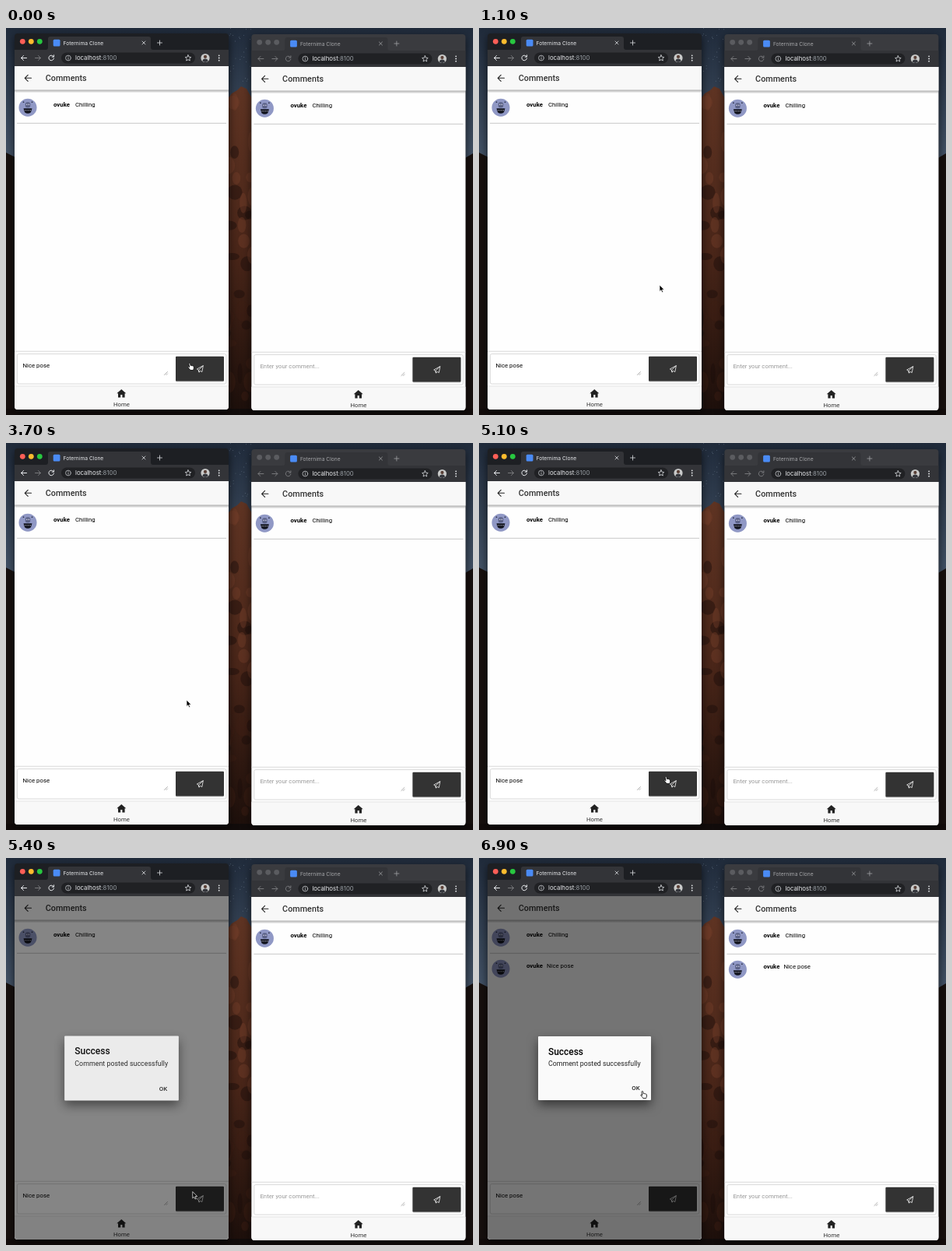
These frames come from a looping animation (600x497 px, 7000 ms). An HTML page:

```html
<!DOCTYPE html>
<html lang="en">
<head>
<meta charset="utf-8">
<title>Comments</title>
<style>
html, body { margin: 0; width: 100%; height: 100%; overflow: hidden; background: #140d0b; }
svg { display: block; width: 600px; height: 497px; font: 7.8px Roboto, sans-serif; fill: #000; }
.chrome { font-family: Inter, sans-serif; }
.bold { font-weight: 700; }
.medium { font-weight: 500; }
.line { fill: none; stroke-linecap: round; stroke-linejoin: round; }
.window { filter: drop-shadow(0 4px 6px #000a); }
</style>
</head>
<body>
<svg id="stage" viewBox="0 0 600 497"></svg>
<script>
const LOOP = 7000;
const PAGE = "M11 49H286V486a4 4 0 0 1-4 4H15a4 4 0 0 1-4-4Z";
const stage = document.getElementById("stage");

const rect = (x, y, w, h, fill, more = "") =>
  `<rect x="${x}" y="${y}" width="${w}" height="${h}" fill="${fill}" ${more}/>`;
const dot = (x, y, r, fill) => `<circle cx="${x}" cy="${y}" r="${r}" fill="${fill}"/>`;
const line = (d, color, width = 1) =>
  `<path class="line" d="${d}" stroke="${color}" stroke-width="${width}"/>`;
const text = (x, y, words, more = "") => `<text x="${x}" y="${y}" ${more}>${words}</text>`;

function backdrop() {
  let rocks = "", stars = "", seed = 7;
  const random = () => (seed = seed * 16807 % 2147483647) / 2147483647;
  for (let i = 0; i < 34; i++) {
    const y = 95 + random() * 390;
    const fill = random() < .5 ? "#1a0e0b" : y < 310 ? "#743f2a" : "#3d1f15";
    rocks += `<ellipse cx="${284 + random() * 34}" cy="${y}" rx="${3 + random() * 7}"
      ry="${4 + random() * 10}" fill="${fill}" opacity=".45"/>`;
  }
  for (let i = 0; i < 26; i++)
    stars += dot(286 + random() * 30, random() * 72, .35, "#9fb0c4");
  return `<defs>
    <linearGradient id="sky" x2="0" y2="1"><stop stop-color="#202b3b"/><stop offset="1" stop-color="#46566a"/></linearGradient>
    <linearGradient id="rock" x2="0" y2="1"><stop stop-color="#5f3423"/><stop offset=".5" stop-color="#4a2619"/>
      <stop offset="1" stop-color="#1c0f0b"/></linearGradient>
    <linearGradient id="fade" x2="0" y2="1"><stop stop-opacity=".32"/><stop offset="1" stop-opacity="0"/></linearGradient>
    </defs>` +
    rect(0, 0, 600, 180, "url(#sky)") + stars +
    `<path d="M0 160L12 166V497H0ZM588 168L600 161V497H588Z" fill="#17100e"/>
    <path d="M284 92L290 84 297 80 302 75 309 78 317 92V497H284Z" fill="url(#rock)"/>` +
    rocks + rect(0, 489, 600, 8, "#120c0b");
}

const avatar = y => dot(28, y, 11.5, "#9098c5") + dot(22.5, y - 7, .9, "#30364f") +
  dot(33.5, y - 7, .9, "#30364f") + rect(24.8, y - 7, 6.4, 7, "#5b6287", 'rx="2.5"') +
  dot(26.8, y - 4, .8, "#dde") + dot(29.4, y - 4, .8, "#dde") +
  `<path d="M22.5 ${y + 1}H33.5L32 ${y + 6}Q28 ${y + 9} 24 ${y + 6}Z" fill="#11131d"/>` +
  line(`M24.7 ${y + 3.5}h6.8`, "#d5d8e8", "1.1\" stroke-dasharray=\".2 2");

const comment = (y, x, words) => avatar(y) +
  text(61, y - 1.2, "ovuke", 'class="bold"') + text(x, y - 1.2, words);

function browser(active) {
  const dim = active ? "#e8eaed" : "#77787b";
  const lights = active ? ["#ff5f57", "#febc2e", "#28c840"] : ["#5b5c60", "#5b5c60", "#5b5c60"];
  const bar = "#333438";
  return `<g class="window">` +
    rect(11, 7, 275, 483, active ? "#1d1f23" : "#3a3b3f", 'rx="4"') +
    `<path d="M51 28q3 0 3-3V14q0-3 3-3H183q3 0 3 3V25q0 3 3 3Z" fill="${bar}"/>` +
    rect(11, 28, 275, 21, bar) +
    lights.map((color, i) => dot(21.3 + i * 11, 17.3, 3.4, color)).join("") +
    rect(60.7, 14.7, 8.8, 8.8, "#4a8bf5", 'rx="1.5"') +
    text(73.5, 21.7, "Foternima Clone", `class="chrome" font-size="6.7" fill="${active ? "#e8eaed" : "#a5a6a9"}"`) +
    line("M175 17l4 4m0-4l-4 4M194.5 19h6m-3-3v6", active ? "#dadce0" : "#a0a1a4", .8) +
    line("M26.5 38.5h-7m3-3l-3 3 3 3", dim) +
    line("M37.5 38.5h7m-3-3l3 3-3 3", "#77787b") +
    line("M61 36.6A3.3 3.3 0 1 0 61.5 39M61.5 34.8v2.3h-2.3", dim) +
    rect(71, 31.5, 172, 14, "#202124", 'rx="7"') +
    line("M80 38v2.2M80 36.4v.1M83.4 38.5a3.4 3.4 0 1 0-6.8 0a3.4 3.4 0 1 0 6.8 0", "#c4c7cb", .8) +
    text(89, 41.3, 'localhost<tspan fill="#9aa0a6">:8100</tspan>', 'class="chrome" fill="#e8eaed"') +
    line("M234 34.7l1.1 2.5 2.7.3-2 1.8.5 2.7-2.3-1.4-2.3 1.4.5-2.7-2-1.8 2.7-.3Z", "#dadce0", .8) +
    dot(256, 38.5, 5.6, "#c9cac9") + dot(256, 36.9, 2.1, "#5a4037") +
    `<path d="M252.4 42.6q.3-3.2 3.6-3.2t3.6 3.2q-3.6 2.6-7.2 0Z" fill="#34363c"/>` +
    [35.3, 38.5, 41.7].map(y => dot(273.7, y, .9, "#e8eaed")).join("") +

    `<path d="${PAGE}" fill="#fefefe"/>` +
    rect(11, 49, 275, 30.5, "#f8f8f8") + rect(11, 79.5, 275, 4, "url(#fade)") +
    line("M32.5 64.3h-8.3m4-4l-4 4 4 4", "#222", 1.1) +
    text(50.7, 68.4, "Comments", 'class="medium" font-size="10.8" fill="#333"') +
    comment(102.2, 89, "Chilling") + rect(14, 121.8, 269, 1, "#c9c9c9") +
    `<g class="late">${comment(142.2, 87, "Nice pose")}</g>` +

    rect(11, 414.8, 275, .8, "#d2d2d2") +
    rect(14.4, 418.6, 268.4, 38.4, "#fff", 'rx="2" stroke="#d0d0d0" stroke-width=".8"') +
    (active ? text(21.5, 436, "Nice pose") : text(22, 436, "Enter your comment...", 'fill="#999"')) +
    line("M203.5 445.5l4-4m-1.6 4l1.6-1.6", "#777", .6) +
    rect(218, 422.5, 62, 32, "#0003", 'rx="1.5"') + rect(218, 421.8, 62, 31.7, "#333", 'rx="1"') +
    line("M253 433.8L245.3 438l2.2 1.4.6 2.6 1.4-1.6 2 1Zl-5.5 5.6.6 2.6", "#fff", .75) +
    `<path d="M11 460H286V486a4 4 0 0 1-4 4H15a4 4 0 0 1-4-4Z" fill="#f8f8f8"/>` +
    rect(11, 459.6, 275, .7, "#dadada") +
    `<path d="M148.3 464l-6 5.3h1.7v5.2h3.2v-3.4h2.2v3.4h3.2v-5.2h1.7Z" fill="#222"/>` +
    text(148.5, 485.6, "Home", 'text-anchor="middle" fill="#333"') + "</g>";
}

stage.innerHTML = backdrop() + browser(true) +
  `<g transform="translate(304.4 1)">${browser(false)}</g>
  <path id="shade" d="${PAGE}"/>
  <g id="alert"><g style="filter:drop-shadow(0 6px 7px #0008)">${rect(76, 229, 145, 82, "#fafafa", 'rx="1"')}</g>` +
  text(89, 252.6, "Success", 'class="medium" font-size="11.9"') +
  text(89, 267.4, "Comment posted successfully", 'font-size="8.8" fill="#222"') +
  text(196.3, 298.4, "OK", 'class="medium" fill="#222"') + `</g>
  <path id="arrow" d="M0 0V8.4L1.9 6.6 3.2 9.5 4.6 8.9 3.3 6.1H5.9Z" stroke="#fff" stroke-width=".7"/>
  <path id="hand" transform="" fill="#fff" stroke="#000" stroke-width=".8" stroke-linejoin="round"
    d="M-.3 .1C.3-.5 1.1-.1 1.2.7L1.6 3.1C2 2.5 2.9 2.6 3.1 3.3 3.5 2.8 4.3 3 4.5 3.7 5 3.4 5.8 3.7 5.8 4.5L5.9 6.5C5.9 7.5 5.1 8.1 5 9H1.3C1.1 8.1-.7 6.7-1.6 5.3-2.1 4.4-1.1 4-.5 4.6L.3 5.3-.6 1.1Z"/>`;

const [shade, alertBox, arrow, hand] =
  ["shade", "alert", "arrow", "hand"].map(id => document.getElementById(id));
const late = stage.querySelectorAll(".late");

// Each row: time, then the values reached at that time.
const pointer = [[0, 235.5, 430.5], [800, 232, 330], [3700, 232, 330], [4300, 239.8, 428.5],
  [5900, 239.8, 428.5], [6500, 210.2, 300.6], [6700, 210.2, 300.6], [6900, 209.6, 299.6]];
const dialog = [[5200, 0, 0, 1.1], [5300, .19, .3, 1.076], [5400, .48, .88, 1.012],
  [5500, .53, 1, 1], [5600, .54, 1, 1]];

const smooth = u => u * u * (3 - 2 * u);
function track(rows, time, ease = u => u) {
  const next = rows.findIndex(row => row[0] > time);
  if (next === 0) return rows[0].slice(1);
  if (next < 0) return rows.at(-1).slice(1);
  const a = rows[next - 1], b = rows[next];
  const u = ease((time - a[0]) / (b[0] - a[0]));
  return a.slice(1).map((value, i) => value + (b[i + 1] - value) * u);
}
const show = (node, on) => node.setAttribute("visibility", on ? "visible" : "hidden");

function draw(now) {
  const time = Math.floor(now % LOOP / 100) * 100;
  const [x, y] = track(pointer, time, smooth);
  const [dark, opacity, scale] = track(dialog, time);
  const pointing = time < 5300 ? y > 422 : time >= 6500;

  for (const node of [arrow, hand]) node.setAttribute("transform", `translate(${x} ${y})`);
  show(arrow, !pointing);
  show(hand, pointing);
  late.forEach(node => show(node, time >= 6000));
  shade.setAttribute("opacity", dark);
  alertBox.setAttribute("opacity", opacity);
  alertBox.setAttribute("transform", `translate(148.5 270) scale(${scale}) translate(-148.5 -270)`);
}

const start = performance.now();
function tick() {
  draw(performance.now() - start);
  requestAnimationFrame(tick);
}
tick();
</script>
</body>
</html>
```
